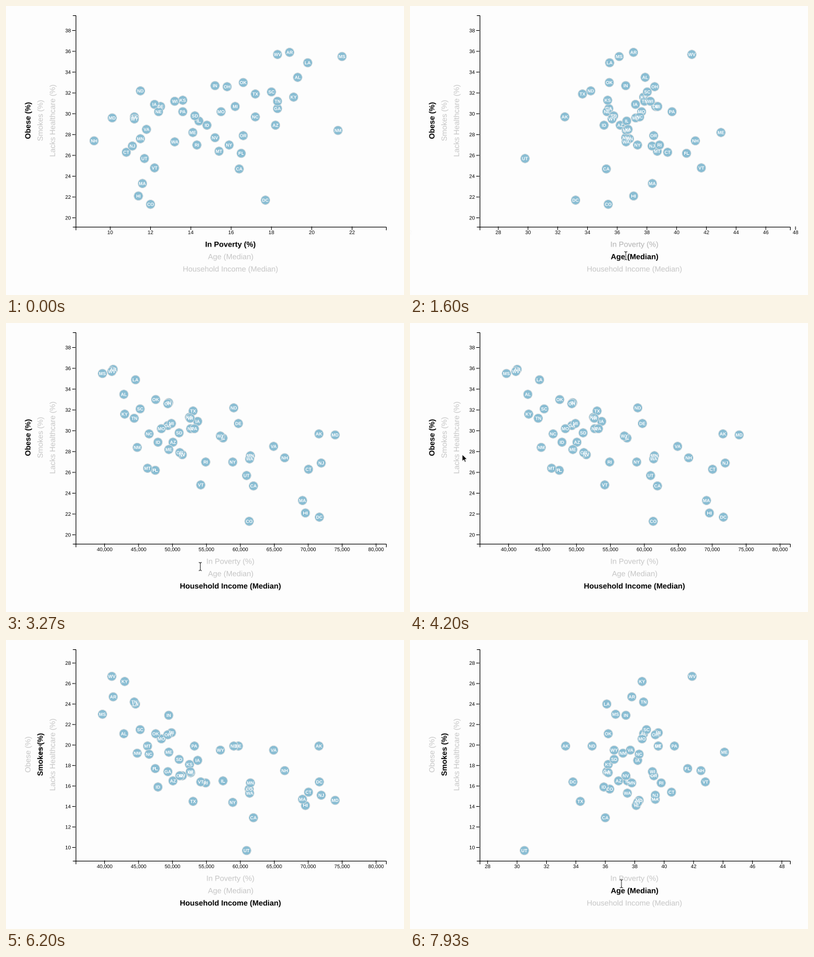
A matplotlib script that plays this animation: 640 px wide and 466 px high, repeating every 8000 ms.

```python
import numpy as np
import matplotlib.pyplot as plt
from matplotlib.animation import FuncAnimation
from matplotlib.collections import PathCollection
from matplotlib.patches import PathPatch
from matplotlib.path import Path
from matplotlib.textpath import TextPath
from matplotlib.transforms import Affine2D, IdentityTransform

W, H, DPI = 640, 466, 64
PX = 72 / DPI
FRAMES, LOOP = 120, 8000
GLIDE = 300  # ms per axis change

STATES = """AL AK AZ AR CA CO CT DE DC FL GA HI ID IL IN IA KS KY LA ME MD MA MI MN
MS MO MT NE NV NH NJ NM NY NC ND OH OK OR PA RI SC SD TN TX UT VT VA WA WV WI WY""".split()

DATA = dict(
    poverty=[19.3, 11.2, 18.2, 18.9, 16.4, 12, 10.8, 12.5, 17.7, 16.5, 18.3, 11.4, 14.8,
             14.4, 15.2, 12.2, 13.6, 19.1, 19.8, 14.1, 10.1, 11.6, 16.2, 11.5, 21.5, 15.5,
             15.4, 12.4, 15.2, 9.2, 11.1, 21.3, 15.9, 17.2, 11.5, 15.8, 16.6, 16.6, 13.6,
             14.3, 18, 14.2, 18.3, 17.2, 11.7, 12.2, 11.8, 13.2, 18.3, 13.2, 11.2],
    age=[38.6, 33.3, 36.9, 37.8, 36, 36.3, 40.5, 39.6, 33.8, 41.6, 36.1, 38.1, 35.9,
         37.5, 37.4, 38.2, 36.2, 38.5, 36.1, 44.1, 38.3, 39.4, 39.6, 37.8, 36.7, 38.5,
         39.6, 36.2, 37.4, 42.5, 39.4, 37.2, 38.2, 38.3, 35.1, 39.4, 36.2, 39.3, 40.7,
         39.8, 38.8, 36.6, 38.6, 34.3, 30.5, 42.8, 37.7, 37.5, 41.9, 39.2, 36.6],
    income=[42830, 71583, 50068, 41262, 61933, 61303, 70048, 59716, 71648, 47463, 49321,
            69592, 47861, 57444, 49446, 53712, 52504, 42958, 44555, 49462, 73971, 69160,
            49847, 61481, 39680, 48363, 46328, 52686, 51450, 66532, 71919, 44803, 58878,
            46556, 59029, 49308, 47529, 51075, 53234, 54891, 45238, 50979, 44361, 53035,
            60922, 54166, 64902, 61366, 41059, 52622, 57055],
    obese=[33.5, 29.7, 28.9, 35.9, 24.7, 21.3, 26.3, 30.7, 21.7, 26.2, 30.5, 22.1, 28.9,
           29.3, 32.7, 30.9, 31.3, 31.6, 34.9, 28.2, 29.6, 23.3, 30.7, 27.6, 35.5, 30.2,
           26.4, 30.2, 27.7, 27.4, 26.9, 28.4, 27, 29.7, 32.2, 32.6, 33, 27.9, 30.2,
           27, 32.1, 29.8, 31.2, 31.9, 25.7, 24.8, 28.5, 27.3, 35.7, 31.2, 29.5],
    smokes=[21.1, 19.9, 16.5, 24.7, 12.9, 15.7, 15.4, 19.9, 16.4, 17.7, 17.4, 14.1, 15.9,
            16.5, 22.9, 18.5, 18.1, 26.2, 24, 19.3, 14.6, 14.7, 21.2, 16.3, 23, 20.6,
            19.9, 17.3, 17, 17.5, 15.1, 19.2, 14.4, 19.1, 19.9, 21, 21.1, 17, 19.9,
            16.3, 21.5, 18.6, 24.2, 14.5, 9.7, 16.4, 19.5, 15.3, 26.7, 17.4, 19.5],
    health=[13.9, 15, 14.4, 16.3, 14.8, 12.8, 8.7, 8.7, 8.3, 17.6, 20.9, 8.1, 16.5,
            11.9, 14.8, 7.7, 14.5, 10, 18.7, 11, 9.2, 4.6, 10.3, 7.3, 18.8, 12.9,
            12.9, 12.4, 17.1, 11.4, 12.5, 15.4, 12.3, 16.1, 8.8, 10.2, 13.9, 11, 10.1,
            8, 17.1, 9.9, 14.2, 24.9, 13.9, 6.7, 13.1, 10.7, 10.1, 8.5, 15.1],
)
DATA = {k: np.array(v) for k, v in DATA.items()}
TICKS = dict(
    poverty=np.arange(10, 23, 2), age=np.arange(28, 49, 2),
    income=np.arange(40000, 80001, 5000), obese=np.arange(20, 39, 2),
    smokes=np.arange(10, 29, 2), health=np.arange(6, 27, 2),
)
X_SPAN, Y_SPAN = (111.8, 610), (355.5, 14.5)
X_STEPS = [(1357, "age"), (2634, "income"), (7350, "age")]
Y_STEPS = [(4450, "health"), (5500, "smokes")]
X_LABELS = dict(poverty="In Poverty (%)", age="Age (Median)",
                income="Household Income (Median)")
Y_LABELS = dict(obese="Obese (%)", smokes="Smokes (%)", health="Lacks Healthcare (%)")

# pointer path: time, x, y
POINTER = np.array([
    (400, 330, 482), (1150, 347, 402), (1900, 347, 403), (2250, 352, 438),
    (2500, 352, 424), (3000, 352, 424), (4100, 84, 212), (4230, 84, 212),
    (4380, 74, 189), (5150, 74, 189), (5400, 55, 176), (6350, 55, 176),
    (7250, 345, 404), (7600, 345, 404), (7850, 340, 393)])

fig = plt.figure(figsize=(W / DPI, H / DPI), dpi=DPI, facecolor="#fdfdfd")
ax = fig.add_axes([0, 0, 1, 1])
ax.set(xlim=(0, W), ylim=(H, 0))
ax.axis("off")


def glyphs(text, size, bold=False, align=0.5):
    path = TextPath((0, 0), text, size=size,
                    prop=dict(family="Liberation Sans", weight="bold" if bold else "normal"))
    box = path.get_extents()
    return path.transformed(Affine2D().translate(-box.x0 - align * box.width, 0))


def shift(path, dx, dy):
    return path.transformed(Affine2D().translate(dx, dy))


def rect(x, y, w, h):
    return Path.unit_rectangle().transformed(Affine2D().scale(w, h).translate(x, y))


def stamps(paths, z, **style):
    """Pixel-sized shapes whose offsets are stage positions."""
    col = PathCollection(paths, offsets=np.zeros((len(paths), 2)),
                         offset_transform=ax.transData,
                         transform=IdentityTransform(), zorder=z, **style)
    return ax.add_collection(col, autolim=False)


def shape(path, z, **style):
    patch = PathPatch(path, transform=IdentityTransform(), zorder=z, **style)
    return ax.add_artist(patch)


def place(key, values, span):
    lo, hi = DATA[key].min() * 0.9, DATA[key].max() * 1.1
    return span[0] + (values - lo) / (hi - lo) * (span[1] - span[0])


def blend(t, first, steps):
    old = new = first
    start = -GLIDE
    for at, key in steps:
        if t >= at:
            old, new, start = new, key, at
    u = min((t - start) / GLIDE, 1)
    p = 4 * u**3 if u < 0.5 else 1 - 4 * (1 - u)**3
    return old, new, u, p


class Axis:
    def __init__(self, labels, steps, span, vertical):
        self.first = next(iter(labels))
        self.steps, self.span, self.vertical = steps, span, vertical
        self.ticks = {k: stamps([self.tick(v) for v in TICKS[k]], 2, linewidths=0)
                      for k in labels}
        self.labels = {k: [self.label(s, i, b) for b in (False, True)]
                       for i, (k, s) in enumerate(labels.items())}

    def tick(self, value):
        text = f"{value:,}"
        if self.vertical:
            parts = shift(glyphs(text, 8.2, align=1), -7.5, -2.9), rect(-5, -0.5, 5, 1)
        else:
            parts = shift(glyphs(text, 8.2), 0, -12.3), rect(-0.5, -5.5, 1, 5.5)
        return Path.make_compound_path(*parts)

    def label(self, text, row, bold):
        path = glyphs(text, 12.2, bold)
        if self.vertical:
            path = path.transformed(Affine2D().rotate_deg(90))
            path = shift(path, 39.3 + 19.8 * row, H - 184.8)
        else:
            path = shift(path, 361, H - 388.4 - 19.9 * row)
        return shape(path, 3, linewidth=0)

    def update(self, t):
        old, new, u, p = blend(t, self.first, self.steps)

        def glide(a, b):
            return (1 - p) * place(old, a, self.span) + p * place(new, b, self.span)

        for key, col in self.ticks.items():
            col.set_visible(key in (old, new))
            values = TICKS[key]
            pos = np.clip(glide(values, values), -500, 1200)
            rgba = np.zeros((len(values), 4))
            if key == new:
                rgba[:, 3] = np.where(np.isin(values, TICKS[old]), 1, p)
            elif key == old:
                rgba[:, 3] = np.where(np.isin(values, TICKS[new]), 0, 1 - p)
            col.set_facecolor(rgba)
            fixed = np.full(len(pos), 111.5 if self.vertical else 355.5)
            pair = (fixed, pos) if self.vertical else (pos, fixed)
            col.set_offsets(np.column_stack(pair))

        for key, (plain, bold) in self.labels.items():
            bold.set_visible(key == new)
            plain.set_visible(key != new)
            bold.set_facecolor("black")
            fade = 1 - (1 - u)**1.4 if key == old else 1
            plain.set_facecolor(str(0.775 * fade))
        return glide(DATA[old], DATA[new])


def smooth_pointer(t):
    times = POINTER[:, 0]
    i = int(np.clip(np.searchsorted(times, t, "right") - 1, 0, len(times) - 2))
    u = np.clip((t - times[i]) / (times[i + 1] - times[i]), 0, 1)
    return POINTER[i, 1:] + (POINTER[i + 1, 1:] - POINTER[i, 1:]) * u * u * (3 - 2 * u)


line = dict(color="black", lw=PX, zorder=1, solid_joinstyle="miter", solid_capstyle="butt")
ax.plot([106.5, 111.5, 111.5, 106.5], [14.5, 14.5, 355.5, 355.5], **line)
ax.plot([111.5, 111.5, 610.5, 610.5], [361, 355.5, 355.5, 361], **line)

x_axis = Axis(X_LABELS, X_STEPS, X_SPAN, False)
y_axis = Axis(Y_LABELS, Y_STEPS, Y_SPAN, True)
dots = stamps([Path.circle((0, 0), 7.3)] * len(STATES), 4,
              facecolors="#89bdd3", edgecolors="#e3e3e3", linewidths=0.8 * PX)
names = stamps([shift(glyphs(s, 7.3, True), 0, -2.6) for s in STATES], 5,
               facecolors="white", linewidths=0)

ARROW = Path([(0, 0), (0, -11), (2.6, -8.6), (4.3, -12.4), (6.1, -11.6),
              (4.5, -7.9), (8, -7.7), (0, 0)], closed=True)
BEAM = Path([(-2.5, 6.5), (-1, 6.5), (0, 5.5), (0, -5.5), (-1, -6.5), (-2.5, -6.5),
             (2.5, 6.5), (1, 6.5), (0, 5.5), (2.5, -6.5), (1, -6.5), (0, -5.5)],
            [1, 2, 2, 2, 2, 2] + [1, 2, 2] * 2)
arrow = shape(ARROW, 7, facecolor="black", edgecolor="white", linewidth=0.8 * PX)
beam = shape(BEAM, 7, facecolor="none", edgecolor="#222222", linewidth=0.9 * PX)


def draw(i):
    t = i * LOOP / FRAMES
    spots = np.column_stack([x_axis.update(t), y_axis.update(t)])
    dots.set_offsets(spots)
    names.set_offsets(spots)

    x, y = smooth_pointer(t)
    on_text = (284 < x < 438 and 378 < y < 430) or (30 < x < 80 and 126 < y < 243)
    for art, shown in ((beam, on_text), (arrow, not on_text)):
        art.set_visible(bool(shown and t > POINTER[0, 0]))
        art.set_transform(Affine2D().translate(x, H - y))
    return []


anim = FuncAnimation(fig, draw, frames=FRAMES, init_func=lambda: draw(0),
                     interval=LOOP / FRAMES, repeat=True, repeat_delay=0, blit=False)
plt.show()
```
